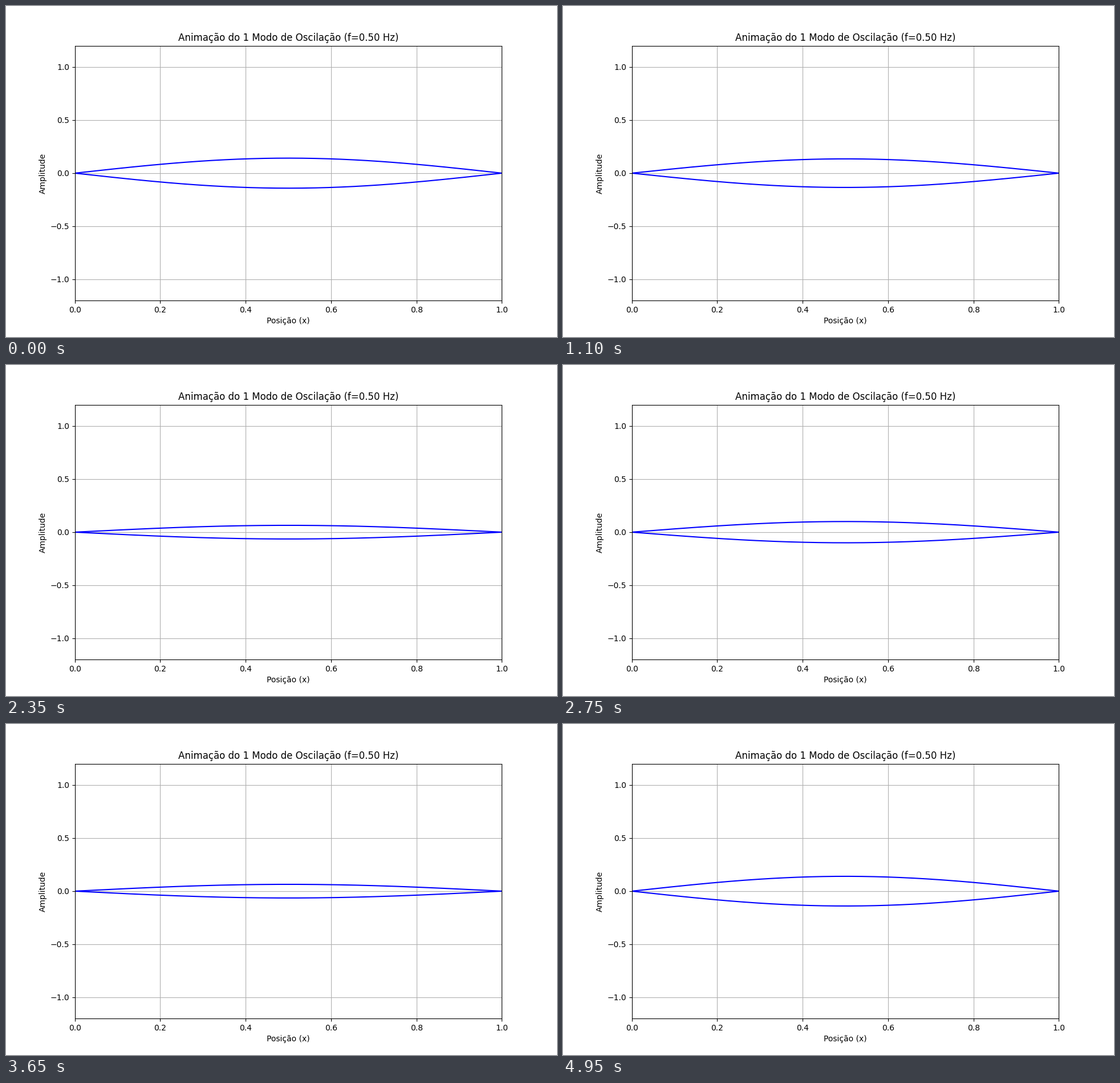
Recreate the animation shown at these times as a matplotlib script. Size 966 by 580 pixels, loop 5 s.

```python
import matplotlib.pyplot as plt
import numpy as np
from matplotlib.animation import FuncAnimation

FREQ = 0.5                  # Hz
AMP = 0.1 * np.sqrt(2)
STEP = 50                   # ms per frame
FRAMES = 100

x = np.linspace(0, 1, 200)
mode = AMP * np.sin(np.pi * x)

fig, ax = plt.subplots(figsize=(9.66, 5.8), dpi=100)
ax.set_xlim(0, 1)
ax.set_ylim(-1.2, 1.2)
ax.set_title("Animação do 1 Modo de Oscilação (f=0.50 Hz)")
ax.set_xlabel("Posição (x)")
ax.set_ylabel("Amplitude")
ax.grid(True)

upper, = ax.plot(x, mode, color="blue")
lower, = ax.plot(x, -mode, color="blue")


def update(frame):
    t = frame * STEP / 1000
    y = mode * np.cos(2 * np.pi * FREQ * t)
    upper.set_ydata(y)
    lower.set_ydata(-y)
    return upper, lower


anim = FuncAnimation(fig, update, frames=FRAMES, interval=STEP,
                     repeat=True, repeat_delay=0)

plt.show()
```
